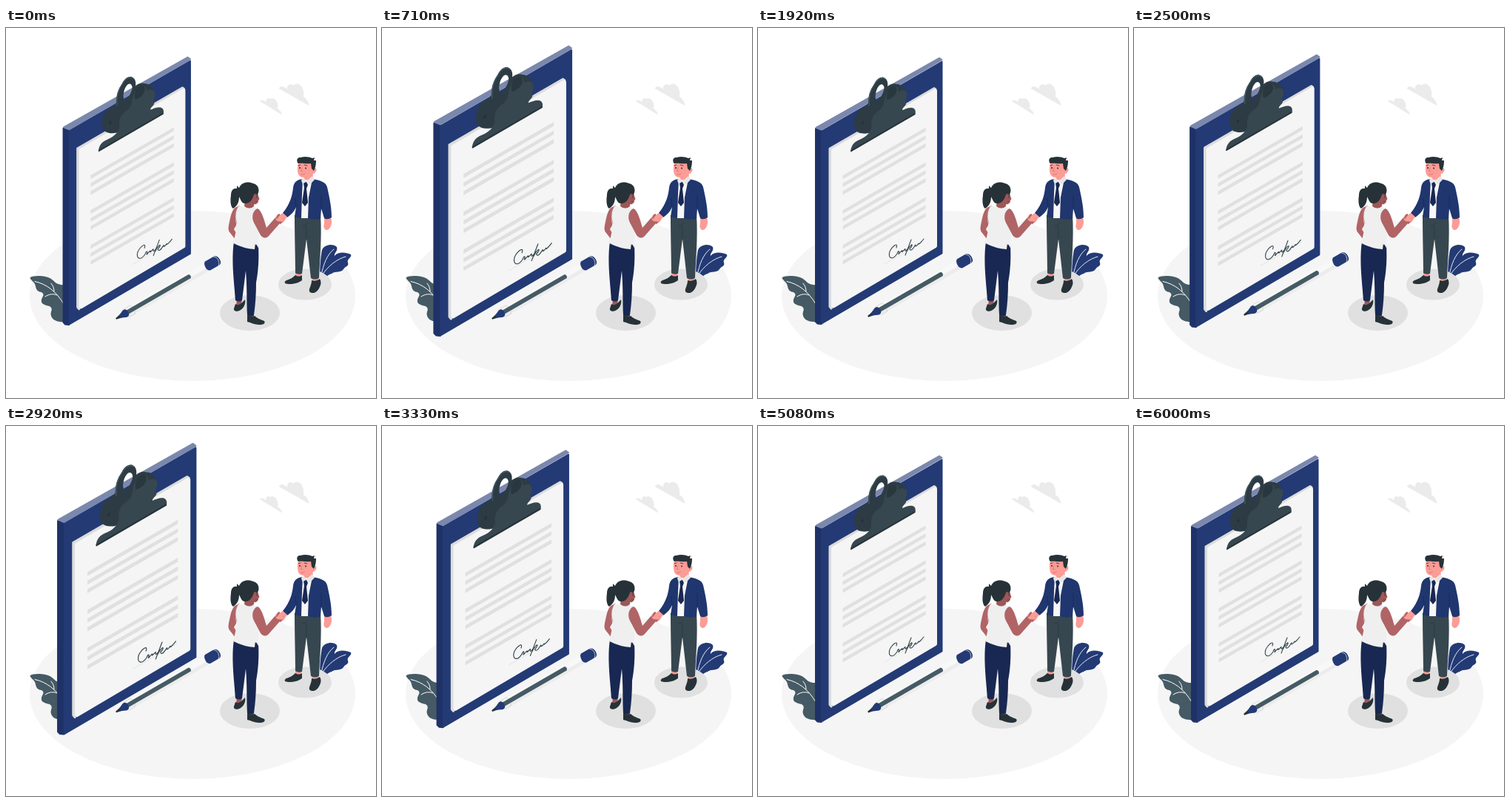
Recreate the animation shown at these times as an HTML page. Size 500 px wide and 500 px high, loop 6.04 s.

```html
<!DOCTYPE html>
<html lang="en">
<head>
<meta charset="utf-8">
<title>Signed agreement</title>
<style>
  html, body { margin: 0; width: 100%; height: 100%; overflow: hidden; background: #fff; }
  svg { display: block; width: 100%; height: 100%; }
  .navy { fill: #233a75; }
  .jacket { fill: #20366e; }
  .deep { fill: #182852; }
  .slate { fill: #455a64; }
  .steel { fill: #37474f; }
  .ink { fill: #263238; }
  .brown { fill: #9d5757; }
  .arm { fill: #b06466; }
  .pink { fill: #fb9c96; }
  .pale { fill: #f5f5f5; }
  .grey { fill: #e0e0e0; }
  .cloud { fill: #ebebeb; }
  .line { fill: none; stroke-linecap: round; stroke-linejoin: round; }
</style>
</head>
<body>
<svg viewBox="0 0 500 500" xmlns="http://www.w3.org/2000/svg">
  <ellipse class="pale" cx="252" cy="362" rx="220" ry="115"/>

  <g class="cloud">
    <path d="M369 82C369 78 376 78 380 83C379 76 386 74 388 78C391 73 400 76 401 83C403 86 402 90 402 93C406 95 409 100 409.500 105Z"/>
    <path d="M343 99C345 96 349 98 351 100C351 95 355 94 357 96C360 93 366 97 367 102C368 105 367 107 367 109C370 111 373 114 373 117.500Z"/>
  </g>

  <g id="leftPlant">
    <path class="slate" d="M32.500 337C37 334 54 334 61 339C67 343 67 348 82 347V397C72 398 63 396 61 389C59 383 65 380 59 376C50 374 47 372 48 367C49 363 53 360 48 357C40 356 41 351 39 346C37 342 33 341 32.500 337Z"/>
    <path class="line" stroke="#fff" stroke-width="1" d="M39 342.500C55 346 68 356 78 373M61 345C64 349 65 352 65 356M53 363C59 359 64 359 69 361"/>
  </g>
  <g id="rightPlant">
    <path class="navy" d="M424 341C424 322 425 311 427 300C430 292 443 291 447 296C449 301 443 304 444 308C449 302 459 303 466 306C468 310 460 312 462 317C464 322 458 322 456 326C453 331 445 328 440 332C434 334 431 338 426 341Z"/>
    <path class="line" stroke="#fff" stroke-width=".9" d="M426 334C429 319 434 306 443 299M427 334C435 322 447 312 459 309"/>
  </g>

  <g id="board">
    <path fill="#1f3268" stroke="#1f3268" stroke-width="2" stroke-linejoin="round" d="M78 136L85.500 139V400L80.500 399.500L78 397Z"/>
    <path fill="#7b88ae" stroke="#7b88ae" stroke-width="2" stroke-linejoin="round" d="M78.500 134.500L245 40.500L248.500 43L85.500 137.500Z"/>
    <path class="navy" stroke="#233a75" stroke-width="2" stroke-linejoin="round" d="M86 139.500L248.500 45.500V304.500L86 399.500Z"/>
    <path class="grey" stroke="#dcdcdc" stroke-width="3" stroke-linejoin="round" d="M97 163L238 81.500L240 83L99 166V379L97 376.500Z"/>
    <path class="pale" stroke="#f5f5f5" stroke-width="5" stroke-linejoin="round" d="M101.500 165.500L239.500 85V294.500L101.500 376Z"/>
    <g id="lines" class="grey"></g>
    <path class="line" stroke="#e0e0e0" stroke-width=".8" d="M171 319L225 288"/>
    <path class="line" stroke="#37474f" stroke-width="1.100" d="M187 297C190 289 182 294 178 302C175 312 182 314 188 305C189 301 192 300 190 305C189 308 195 299 195 301C193 306 200 296 199 299C198 304 202 299 204 296M207 286C204 294 201 302 199 307M201 302C205 294 209 291 208 294C207 298 203 298 206 300C209 301 211 295 213 293C212 297 215 294 217 291C216 294 220 290 224 285"/>
    <g id="clip">
      <path fill="#2d3c44" fill-rule="evenodd" d="M132 138C128 131 130 118 136 112C141 107 147 106 149 101C149 90 152 83 157 76C160 69 165 66 169 66.500C174 68 176 73 175 79C178 76 184 74 188 76C192 75 200 81 200.500 87L176 120L153 141C145 144 135 143 132 138ZM158.500 93C159 87 160 82 163.500 78C167 74 171 77 170.500 82C169 90 165 95 160 99Z"/>
      <path class="line" stroke="#455a64" stroke-width="1.200" d="M150 105C149 93 153 82 158 75C162 68 168 66 172 69"/>
      <path class="steel" d="M125 167C126 158 130 154 137 151C147 147 155 139 153 130C153 122 157 116 162 113C168 109 170 104 170.500 98C172 90 176 82 183 80C188 78 190 82 190 86C196 82 202 85 201 91C202 95 197 98 200 101C201 105 195 107 195 111C200 109 207 106 211 109C213 111 213 113 212.500 116Z"/>
      <path class="ink" d="M125 165.500L212.500 114.800V117L125.500 167.500Z"/>
      <path class="ink" opacity=".75" d="M174 96C173 86 178 79 185 79C190 81 187 91 181 94C178 96 176 98 174 96Z"/>
      <ellipse class="ink" cx="141" cy="128" rx="1.500" ry="2.500" transform="rotate(30 141 128)"/>
    </g>
  </g>

  <g id="pen">
    <g transform="translate(149.500 392.500) rotate(-30)">
      <path fill="#ececec" d="M17-6H142V7H17Z"/>
      <path fill="#f8f8f8" d="M17-6H142V2H17Z"/>
      <path class="line" stroke="#d4d4d4" stroke-width=".8" d="M15-6H25Q28 0 25 7H15"/>
      <path class="slate" d="M16-3H114Q117 0 114 3H16Z"/>
      <path class="ink" d="M-1-1L7-2.500V2.500L-1 1Z"/>
      <path class="navy" d="M5-2L13-5.500Q18-6 18 0Q18 6 13 5.500L5 2Z"/>
      <path class="navy" d="M142-7H156Q161-5 160.500 1Q160 7 156 7H142Q138 5 138.500 0Q139-6 142-7Z"/>
      <path class="line" stroke="#c8cfdf" stroke-width=".8" d="M155-7Q160-3 158 2Q158 5 155 7"/>
    </g>
  </g>

  <ellipse class="grey" cx="329.500" cy="385" rx="40.500" ry="24"/>
  <ellipse class="grey" cx="404" cy="346.500" rx="36" ry="21"/>

  <g id="man">
    <path class="pink" d="M391 329H399L399 338H391ZM413 335H422V344H414Z"/>
    <path class="ink" d="M391 334Q396 337 400 334V341C396 344 390 346 382 346C376 346 375 343 379 341C385 339 388 337 391 334ZM413 341Q419 343 424 339C427 344 425 348 423 352C420 358 413 360 410 356C409 352 413 348 413 341Z"/>
    <path class="steel" d="M390 253H425C427 283 424 313 423 338Q418 341 412 338L406 285L400 332Q395 334 391 331C391 308 390 283 390 253Z"/>
    <path class="line" stroke="#2b383e" stroke-width=".8" d="M406 267L406 286M407 263Q405 267 401 267"/>
    <path class="pink" d="M430 254L439 255C441 263 440 268 436 272C432 275 428 271 430 264Z"/>
    <path fill="#f7f7f7" d="M399 203L415 201L418 222L409 257H399Z"/>
    <path class="jacket" d="M401 204C392 205 389 209 388 216C387 226 384 238 374 250L380 256C386 252 390 247 392 242L390 255L399 257L400 225ZM414 204C425 206 432 208 434 215C437 228 440 242 440 256Q434 260 430 257L426 244L425 258Q415 260 408 257L409 229Z"/>
    <path class="deep" d="M402 209L406 208L408 212L406 217L408 236L404 241L400 236L403 216Z"/>
    <path class="line" stroke="#172750" stroke-width=".7" d="M426 226V245M391 230L392 242"/>
    <path class="pink" d="M402 195L414 192L415 202Q409 208 403 204Z"/>
    <path fill="#e9e5e5" d="M401 202L406 207L401 211L399 206ZM414 200L417 205L410 212L406 207Z"/>
    <path class="pink" d="M395 180H413L415 190C421 186 421 196 415 197C413 201 408 203 403 202C396 202 394 198 394 190Z"/>
    <path class="ink" d="M395 183C392 180 393 174 398 175C403 173 410 174 414 176L417 175L416 179L419 179C419 185 418 189 416 193L413 190L412 183C406 184 400 182 395 183Z"/>
    <path class="line" stroke="#263238" stroke-width=".8" d="M395 186L398 185M403 185L407 186"/>
    <circle class="ink" cx="397" cy="189" r="1"/><circle class="ink" cx="405" cy="189.500" r="1"/>
    <path class="line" stroke="#d96f6c" stroke-width=".8" d="M400 189L398.500 193L401 194M399 198Q402 199 404 197"/>
    <path class="pink" d="M374 250L380 255L376 261C373 265 368 264 366 260L368 254Z"/>
  </g>

  <g id="woman">
    <path class="brown" d="M312 365H319L318 376H311ZM327 383H335V393H326Z"/>
    <path class="ink" d="M310 373Q315 376 319 371L323 367C324 372 322 378 317 381C313 384 307 383 308 379ZM326 388Q331 391 336 389C340 393 345 394 349 396C351 399 348 401 342 401C336 401 331 398 326 397Z"/>
    <path class="deep" d="M308 289L341 293C342 312 341 328 338 344C338 360 337 374 335 388Q331 391 326 388C325 370 326 351 324 328L319 368Q315 371 310 368C309 348 304 315 308 289Z"/>
    <path class="arm" d="M314 241C306 242 304 252 302 262C300 270 300 274 303 277L310 286L313 280L308 272L316 258Z"/>
    <path fill="#efefef" d="M315 239Q325 245 335 242L342 245C345 252 343 262 341 271L341.500 298L337 290L336 299Q321 298 307.500 291C309 280 312 274 311 264C309 256 310 246 315 239Z"/>
    <path class="line" stroke="#b98986" stroke-width=".8" d="M315 240C309 246 309 256 312 264"/>
    <path class="arm" d="M340 244C346 247 349 260 352 270L365 255Q368 250 370 252L369 256L375 257C376 261 373 264 370 264L355 281C351 285 347 284 344 280L335 263C331 255 334 246 340 244Z"/>
    <path class="brown" d="M323 231H335V241Q329 246 322 241Z"/>
    <path class="brown" d="M329 220H339L341 227L342.500 231L341 233C341 237 338 239 333 238L328 233Z"/>
    <path class="ink" d="M315 216C318 208 328 207 334 210C342 212 343 220 340 225L336 224C334 226 334 229 332 232C328 238 321 239 318 234L315 228C315 235 313 240 307 244C303 241 303 233 304 226C304 219 308 216 312 217L312 213Z"/>
    <path class="line" stroke="#263238" stroke-width=".9" d="M338 226L340 226M339 228V229"/>
    <path class="line" stroke="#78403f" stroke-width=".8" d="M337 235L340 234.500"/>
  </g>

  <path class="pink" d="M364 256C367 253 371 254 374 256L376 261C373 263 370 260 366 262Z"/>
  <path class="line" stroke="#b06466" stroke-width="1.800" d="M365 261L371 264M366 257L369 252"/>
</svg>

<script>
  const LOOP = 6040;
  const LEAD = 30;            // the picture is slightly ahead of the loop start
  const CENTER = [163.5, 220.5];

  // Piecewise linear curve through [time, value] pairs
  function track(points, t) {
    const i = points.findIndex(([time]) => time > t);
    if (i < 0) return points[points.length - 1][1];
    if (i === 0) return points[0][1];
    const [t0, v0] = points[i - 1];
    const [t1, v1] = points[i];
    return v0 + (v1 - v0) * (t - t0) / (t1 - t0);
  }

  const heartbeat = [[0, 1], [600, 1.1], [1800, 1], [2400, 1], [3000, 1.1], [3600, 1]];
  const floating = [[1000, 0], [4000, -10], [7000, 0]];

  function buildLines() {
    let d = "";
    for (let group = 0; group < 3; group++) {
      for (let row = 0; row < 3; row++) {
        const y = 134.6 + 47 * group + 10.7 * row;
        d += `M226.500 ${y}v5L114.500 ${y + 69.6}v-5Z`;
      }
    }
    document.getElementById("lines").innerHTML = `<path d="${d}"/>`;
  }

  const board = document.getElementById("board");
  const pen = document.getElementById("pen");

  function draw(now) {
    const t = now % LOOP + LEAD;
    const scale = track(heartbeat, t);
    const [x, y] = CENTER.map(c => c * (1 - scale));
    board.setAttribute("transform", `translate(${x} ${y}) scale(${scale})`);
    pen.setAttribute("transform", `translate(0 ${track(floating, t)})`);
  }

  function tick() {
    draw(performance.now());
    requestAnimationFrame(tick);
  }

  buildLines();
  tick();
</script>
</body>
</html>
```
